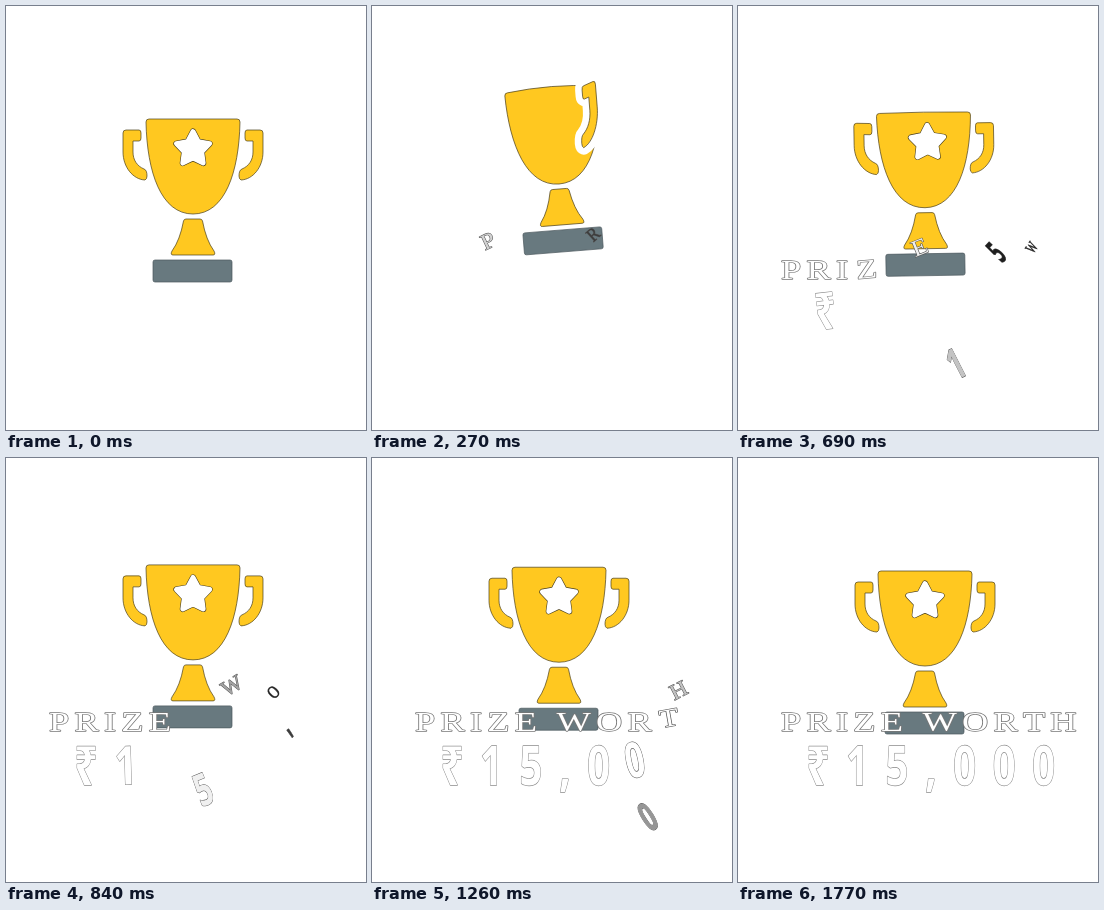
Animation, 360 px wide and 424 px high, one loop 1.83 s. Source, as an HTML page with a canvas:

```html
<!DOCTYPE html>
<html lang="en">
<head>
<meta charset="utf-8">
<title>Prize worth ₹15,000</title>
<style>
html, body { margin: 0; width: 100%; height: 100%; overflow: hidden; background: #fff; }
canvas { display: block; width: 360px; height: 424px; }
</style>
</head>
<body>
<canvas id="stage" width="360" height="424"></canvas>
<script>
const ctx = document.getElementById('stage').getContext('2d');
const LOOP = 1830, TICK = 30;
const GOLD = '#ffc820', SLATE = '#68797f', EDGE = '#4a3f1c';
const HOP = 735, SPIN = 870, SETTLE = 690;
const FLIGHT = 340;
const RAD = Math.PI / 180;

const clamp = v => Math.max(0, Math.min(1, v));
const mix = (a, b, k) => a + (b - a) * k;

// Each glyph circles a hub, then swoops to its place during the last "reach" ms.
const ROWS = [
  {
    text: 'PRIZE WORTH', font: '28px "Liberation Serif", "Times New Roman", serif',
    wide: 1.3, left: 43, gap: 5.2, y: 264, half: 9.3, line: '#777',
    first: 420, step: 100, reach: 280,
    hub: left => {
      const a = (420 - left) * 0.9 * RAD;
      return [288 + 35 * Math.cos(a), 200 + 42 * Math.sin(a)];
    }
  },
  {
    text: '₹15,000', font: '600 54px "Noto Sans", "Open Sans", sans-serif',
    wide: 0.74, left: 68.5, gap: 16.7, y: 307.5, half: 19.3, line: '#8a8a8a',
    first: 730, step: 120, reach: 190,
    hub: left => {
      const a = (left - 160) * 1.5 * RAD;
      return [258 + 25 * Math.sin(a), 312 + 66 * Math.cos(a)];
    }
  }
];

function layout(row) {
  ctx.font = row.font;
  let x = row.left;
  return [...row.text].map((ch, i) => {
    const w = ctx.measureText(ch).width * row.wide;
    const item = { ch, row, x: x + w / 2, land: row.first + i * row.step };
    x += w + row.gap;
    return item;
  });
}

function paint(path, fill, edge = EDGE) {
  ctx.fillStyle = fill;
  ctx.fill(path);
  ctx.strokeStyle = edge;
  ctx.lineWidth = 0.7;
  ctx.stroke(path);
}

// Shapes are relative to the middle of the plinth.
const STEM = new Path2D('M-7 -52H7Q9 -52 9.5 -50Q13 -31 21 -20Q23 -16 20 -16H-20Q-23 -16 -21 -20Q-13 -31 -9.5 -50Q-9 -52 -7 -52Z');
const PLINTH = new Path2D('M-38 -11H37Q39 -11 39 -9V9Q39 11 37 11H-38Q-40 11 -40 9V-9Q-40 -11 -38 -11Z');
// Right handle around its own middle.
const HANDLE = new Path2D('M-4 -25H9Q12 -25 12 -22V-3C12 12 2 24.5 -10 25Q-12 24 -12 21Q-12 15 -9 14C-2 11 2 5 2 -3V-14H-4Q-6 -14 -6 -17V-22Q-6 -25 -4 -25Z');
const STAR = starPath(17.5, 9.2);

function starPath(outer, inner) {
  const p = new Path2D();
  for (let i = 0; i < 10; i++) {
    const a = i * Math.PI / 5 - Math.PI / 2, r = i % 2 ? inner : outer;
    p.lineTo(r * Math.cos(a), r * Math.sin(a));
  }
  p.closePath();
  return p;
}

function cup(arch) {
  paint(new Path2D(`M-47 -149Q-47 -152 -44 -152Q0 ${-152 - arch} 44 -152Q47 -152 47 -149` +
    'C46 -99 32 -57 0 -57C-32 -57 -46 -99 -47 -149Z'), GOLD);
}

function handle(side, turn) {
  const phi = turn + side * Math.PI / 2;
  const depth = Math.cos(phi), out = Math.sin(phi);
  if (depth < -0.35) return;
  const near = Math.max(0, depth), face = out < 0 ? -1 : 1;
  const shape = new Path2D();
  shape.addPath(HANDLE, new DOMMatrix([1, -0.45 * face * near, 0, 1, 58 * out, -116 - 10 * near])
    .scale(face * (0.4 + 0.6 * Math.abs(out)), 1 + 0.25 * near));
  // A white gap sets the handle off from the cup behind it.
  const gap = 14 * clamp(depth * 4);
  if (gap > 0.5) {
    ctx.strokeStyle = '#fff';
    ctx.lineWidth = gap;
    ctx.stroke(shape);
  }
  paint(shape, GOLD);
}

function star(turn) {
  const depth = Math.cos(turn);
  if (depth < 0.3) return;
  ctx.save();
  ctx.translate(46 * Math.sin(turn), -122);
  ctx.scale(depth ** 4, 1);
  ctx.lineWidth = 6;
  ctx.strokeStyle = EDGE;
  ctx.stroke(STAR);
  ctx.lineWidth = 4.8;
  ctx.strokeStyle = ctx.fillStyle = '#fff';
  ctx.stroke(STAR);
  ctx.fill(STAR);
  ctx.restore();
}

function trophy(t) {
  const hop = Math.sin(Math.PI * clamp(t / HOP));
  const lift = t < SETTLE ? 33 * hop : 6.3 * (1 - clamp((t - SETTLE) / 900) ** 2);
  const turn = -2 * Math.PI * (1 - (1 - clamp(t / SPIN)) ** 2.8);
  ctx.save();
  ctx.translate(187 + 5 * hop, 265 - lift);
  ctx.rotate(-5 * hop * RAD);
  paint(PLINTH, SLATE, '#4b585d');
  paint(STEM, GOLD);
  cup(6 * hop);
  star(turn);
  handle(-1, turn);
  handle(1, turn);
  ctx.restore();
}

function glyph({ ch, row, x, land }, t) {
  const left = Math.max(0, land - t);
  if (left > FLIGHT) return;
  const far = left / FLIGHT, pull = clamp(left / row.reach) ** 2;
  const [hx, hy] = row.hub(left);
  const tone = Math.round(255 - 225 * clamp((left - 120) / 150));
  ctx.save();
  ctx.translate(mix(x, hx, pull), mix(row.y, hy, pull));
  ctx.rotate(-far);
  ctx.scale(row.wide * (1 - 0.75 * far), 1 - 0.45 * far);
  ctx.font = row.font;
  ctx.lineWidth = 1.3;
  ctx.strokeStyle = left > 40 ? '#555' : row.line;
  ctx.fillStyle = `rgb(${tone},${tone},${tone})`;
  ctx.strokeText(ch, 0, row.half);
  ctx.fillText(ch, 0, row.half);
  ctx.restore();
}

function draw(now) {
  const t = Math.floor(now % LOOP / TICK) * TICK;
  ctx.fillStyle = '#fff';
  ctx.fillRect(0, 0, 360, 424);
  trophy(t);
  glyphs.forEach(g => glyph(g, t));
}

ctx.lineJoin = 'round';
ctx.textAlign = 'center';
ctx.textBaseline = 'alphabetic';
const glyphs = ROWS.flatMap(layout);
const start = performance.now();
function loop() {
  draw(performance.now() - start);
  requestAnimationFrame(loop);
}
loop();
</script>
</body>
</html>
```
